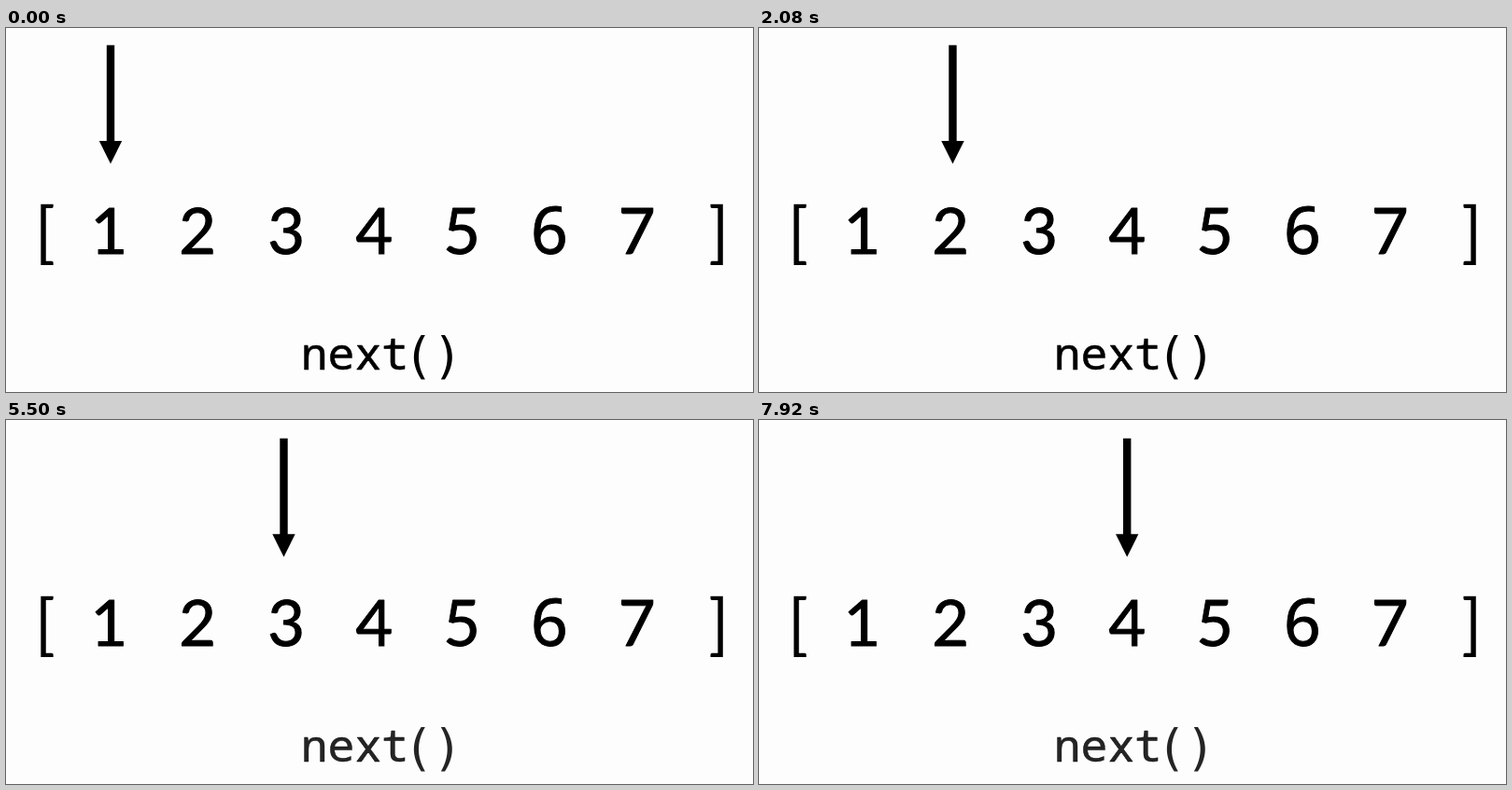
An HTML page with a canvas that plays this animation: 800x390 px, repeating every 8000 ms.

```html
<!DOCTYPE html>
<html lang="en">
<head>
<meta charset="utf-8">
<title>Iterator</title>
<style>
html, body { margin: 0; width: 100%; height: 100%; overflow: hidden; background: #fefdfe; }
canvas { display: block; }
</style>
</head>
<body>
<canvas id="stage" width="800" height="390"></canvas>
<script>
const ctx = document.getElementById('stage').getContext('2d');
const LOOP = 8000, BLINK = 580, MOVE = 1150;
const SANS = 'Lato, sans-serif';
const ROUND = '"Noto Sans", "Open Sans", sans-serif';
const MONO = '"Noto Sans Mono", monospace';
const PAREN = '"DejaVu Sans Mono", monospace';
const STOPS = [112, 207.5, 297.5, 394.2];
const MOVES = [945, 3640, 6025];
const BLINKS = [365, 3030, 5430, 7850];
const clamp = v => Math.max(0, Math.min(1, v));
const ease = p => 0.5 - 0.5 * Math.cos(Math.PI * clamp(p));

function ink(text, size, family) {
  ctx.font = `${size}px ${family}`;
  const m = ctx.measureText(text);
  return {
    left: m.actualBoundingBoxLeft,
    width: m.actualBoundingBoxLeft + m.actualBoundingBoxRight,
    up: m.actualBoundingBoxAscent,
    height: m.actualBoundingBoxAscent + m.actualBoundingBoxDescent
  };
}

// Font size that gives the wanted ink height
const fit = (text, family, height) => 100 * height / ink(text, 100, family).height;

// Text with its ink centred on cx; weight thickens the strokes
function put(text, size, family, cx, baseline, weight) {
  const m = ink(text, size, family);
  const x = cx - m.width / 2 + m.left;
  ctx.fillText(text, x, baseline);
  if (weight) {
    ctx.lineWidth = weight;
    ctx.strokeText(text, x, baseline);
  }
}

// One tall character, placed by the top of its ink
function putTall(text, family, cx, top, height) {
  const size = fit(text, family, height);
  put(text, size, family, cx, top + ink(text, size, family).up, 0);
}

function drawList() {
  for (let i = 0; i < 7; i++) {
    const family = i === 5 ? ROUND : SANS;
    put(String(i + 1), fit('1', family, 50), family, 110.6 + 94.27 * i, 241.8, 1);
  }
  putTall('[', SANS, 43.8, 188, 66.5);
  putTall(']', SANS, 761.3, 188, 66.5);
}

function drawArrow(x, y) {
  ctx.fillRect(x - 4.2, y, 8.4, 104);
  ctx.beginPath();
  ctx.moveTo(x - 12.2, y + 102.5);
  ctx.lineTo(x + 12.2, y + 102.5);
  ctx.lineTo(x, y + 127);
  ctx.fill();
}

function drawCall(t) {
  let alpha = 1;
  for (const start of BLINKS) {
    alpha -= 0.5 - 0.5 * Math.cos(2 * Math.PI * clamp((t - start) / BLINK));
  }
  ctx.globalAlpha = clamp(alpha);
  put('next', 48, MONO, 373, 366, 0.5);
  putTall('(', PAREN, 443.3, 328.5, 47.5);
  putTall(')', PAREN, 472.3, 328.5, 47.5);
  ctx.globalAlpha = 1;
}

function draw(t) {
  ctx.fillStyle = '#fefdfe';
  ctx.fillRect(0, 0, 800, 390);
  ctx.fillStyle = ctx.strokeStyle = '#000';
  ctx.lineJoin = 'round';
  let x = STOPS[0];
  MOVES.forEach((start, i) => {
    x += (STOPS[i + 1] - STOPS[i]) * ease((t - start) / MOVE);
  });
  drawArrow(x, 18.4 + 1.3 * ease((t - MOVES[1]) / MOVE));
  drawList();
  drawCall(t);
}

const begin = performance.now();
function frame() {
  draw((performance.now() - begin) % LOOP);
  requestAnimationFrame(frame);
}
frame();
</script>
</body>
</html>
```
